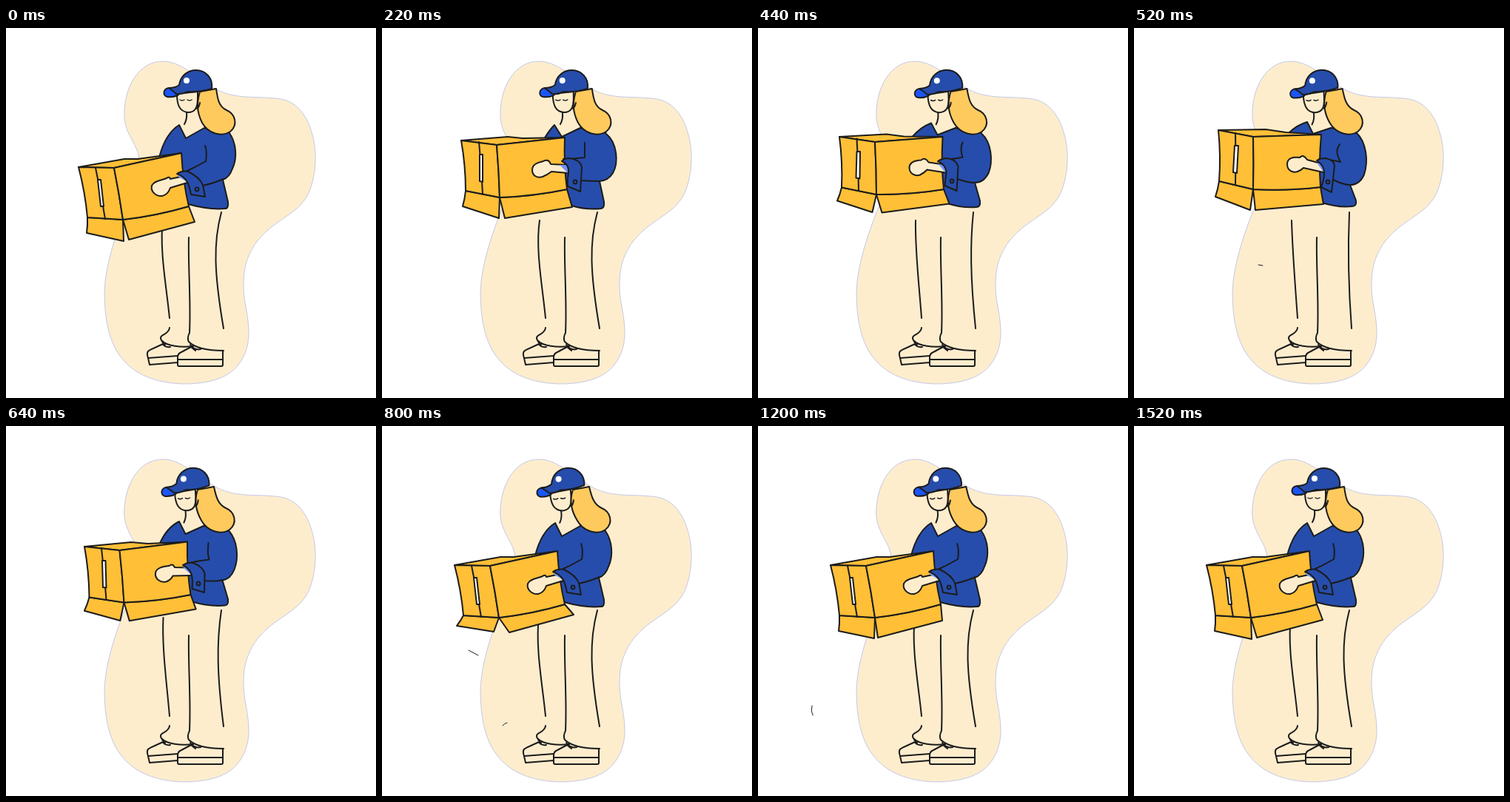
An HTML page that plays this animation: 500 px wide and 500 px high, repeating every 1.54 s.

```html
<!DOCTYPE html>
<html lang="en">
<head>
<meta charset="utf-8">
<title>Courier with a box</title>
<style>
  html, body { margin: 0; width: 100%; height: 100%; overflow: hidden; background: #fff; }
  svg { display: block; width: 100vw; height: 100vh; }
  .ink { stroke: #1c1c1c; stroke-width: 2; stroke-linecap: round; stroke-linejoin: round; fill: none; }
  .ink .skin, .skin { fill: #feedcd; }
  .blue { fill: #264dac; }
  .box { fill: #ffbf37; }
  .hair { fill: #ffca5d; }
  .bright { fill: #1b55f5; }
  .light { fill: #7096f8; stroke: none; }
  .white { fill: #fff; }
  .speck { stroke-width: 1; }
</style>
</head>
<body>
<svg viewBox="0 0 500 500">
  <path fill="#feedcd" stroke="#c3c9e8" stroke-width="1" d="M212 45 C176 45 158 86 160 122 C162 146 179 158 180 178 C181 210 164 237 156 260 C143 295 133 330 133 360 C134 407 143 442 176 464 C211 486 267 485 296 470 C320 457 329 432 328 408 C327 382 320 368 321 342 C322 312 334 288 360 268 C381 252 402 243 411 218 C421 190 421 154 407 125 C396 104 382 96 363 95 C337 92 308 97 281 81 C258 68 237 45 212 45 Z"/>
  <g class="ink">
    <path id="legs"/>
    <path d="M247 283 C246 325 250 368 248 412 C246 415 245 421 247 424 C257 434 275 436 294 436"/>
    <path d="M221 405 C220 416 205 413 210 422 C217 430 237 432 253 430"/>
    <path d="M232 452 L194 455 L192 446 C189 437 192 436 199 433 L212 427 M192 446 L232 443 M212 427 Q215 432 222 431 M211 424 L215 428"/>
    <path d="M293 436 V455 Q293 457 291 457 H234 Q232 457 232 455 V445 Q232 440 237 438 L250 431 M232 448 H293 M249 428 Q255 436 263 434 M250 431 L256 436"/>
    <path id="torso" class="blue"/>
    <g id="carton"></g>
    <path id="hand" class="skin"/>
    <path id="lining" class="light"/>
    <path id="arm" class="blue"/>
    <path id="cuff" class="blue"/>
    <circle id="button" r="2.4"/>
    <g class="head">
      <path d="M244 114 Q245 123 241 130"/>
      <path class="skin" d="M231 89 C231 103 234 113 246 114 C256 114 259 107 259 95 V86 Z"/>
      <path stroke-width="1.5" d="M235 97 Q238 99 241 97 M245 97 Q248 99 251 97"/>
    </g>
    <path id="hair" class="hair"/>
    <g class="head">
      <path d="M262 101 Q261 107 258 109"/>
      <path class="bright" d="M222 81 C212 80 211 92 218 93 Q226 94 232 91 L237 86 Z"/>
      <path class="blue" d="M220 81 Q229 81 234 77 C236 64 246 57 257 57 C270 57 280 68 278 82 Q262 87 246 86 Q238 90 230 89 Q226 85 220 81 Z"/>
      <circle class="white" cx="244" cy="71" r="4" stroke="none"/>
    </g>
    <g id="specks"></g>
  </g>
</svg>
<script>
const LOOP = 1540, STEP = 20;
const $ = id => document.getElementById(id);
const smooth = k => k * k * (3 - 2 * k);
const linear = k => k;
const numbers = /-?\d+(\.\d+)?/g;

// Blend two strings that differ only in their numbers.
function mix(a, b, k) {
  const ends = b.match(numbers);
  let i = 0;
  return a.replace(numbers, n => (+n + (ends[i++] - n) * k).toFixed(2));
}

function pick(times, poses, t, ease) {
  let i = 0;
  while (i < times.length - 2 && t >= times[i + 1]) i++;
  const k = Math.min(1, (t - times[i]) / (times[i + 1] - times[i]));
  return mix(poses[i], poses[i + 1], ease(k));
}

// Rest, first lift, dip, second lift, and back to rest.
const liftTimes = [0, 220, 360, 520, 760, LOOP];
const lift = (poses, t) => pick(liftTimes, [...poses, poses[0], poses[0]], t, smooth);

const shapes = {
  legs: [
    "M212 258 C207 300 217 350 221 392 M291 249 C280 290 281 330 294 406",
    "M213 260 C207 300 217 350 221 392 M291 249 C280 290 281 330 294 406",
    "M213 260 C210 300 218 350 221 392 M291 249 C284 290 285 335 294 406",
    "M213 260 C214 300 218 350 221 392 M291 249 C289 295 289 340 294 406"
  ],
  torso: [
    "M207 175 Q215 143 234 131 L243 149 L268 135 C285 140 300 137 302 142 C311 155 313 175 306 190 Q302 202 293 205 L300 235 Q301 244 296 244 Q275 246 246 238 L215 200 Z",
    "M219 150 Q226 138 233 131 L243 147 L268 135 C285 140 300 137 303 143 C318 155 320 182 312 196 Q306 206 294 207 L300 235 Q301 243 296 244 Q275 246 256 240 L215 200 Z",
    "M207 153 Q219 137 234 130 L243 146 L268 135 C285 140 300 137 303 143 C317 155 319 180 312 194 Q305 206 294 206 L300 234 Q301 243 295 243 Q275 244 258 238 L215 200 Z",
    "M209 142 Q220 131 234 127 L242 143 L266 135 C285 138 299 137 301 142 C314 154 317 180 311 198 Q305 212 292 212 L300 233 Q301 241 295 241 Q275 243 254 236 L225 200 Z"
  ],
  hand: [
    "M241 200 L222 204 Q221 200 217 203 C211 206 200 206 197 213 C195 221 203 228 211 227 Q219 225 222 216 L245 209",
    "M250 185 L228 184 Q225 176 218 180 C210 182 203 184 203 192 C203 200 210 203 217 201 Q224 198 229 194 L251 196",
    "M249 186 L227 185 Q223 178 217 182 C210 184 202 187 202 194 C203 202 210 205 217 203 Q224 199 228 194 L251 196",
    "M252 183 L234 178 Q229 170 224 175 C214 174 207 176 207 184 C207 193 215 196 221 194 Q226 192 229 189 L256 195"
  ],
  lining: [
    "M231 200 L239 197 L245 208 Z",
    "M240 185 L251 185 L251 196 Z",
    "M240 186 L250 186 L251 196 Z",
    "M247 182 L255 184 L256 195 Z"
  ],
  arm: [
    "M269 159 C272 167 271 174 270 180 Q258 187 243 194 L266 213 Q283 209 294 204",
    "M274 155 C274 162 274 168 274 175 Q260 177 245 177 L269 206 Q283 207 294 207",
    "M275 152 C274 157 275 164 274 168 Q272 177 246 179 L270 203 Q283 206 294 206",
    "M278 157 C274 163 272 168 279 181 Q262 177 250 177 L269 205 Q283 212 292 212"
  ],
  cuff: [
    "M231 197 Q238 192 246 194 Q262 202 266 212 L269 228 L250 225 Q248 214 245 208 Q240 200 231 197 Z",
    "M243 180 Q247 176 253 176 Q268 178 270 188 L268 221 L251 214 Q250 205 252 196 Q253 184 243 180 Z",
    "M239 181 Q246 176 253 176 Q266 178 270 188 L270 218 L252 211 Q250 203 252 193 Q250 184 239 181 Z",
    "M247 179 Q252 176 259 176 Q270 178 271 186 L267 222 L253 215 Q257 205 257 195 Q257 186 247 179 Z"
  ]
};
const buttonPoses = ["258 218", "261 208", "262 206", "262 208"];

// Left, tape, front and right top corners, two back corners,
// left, tape, front and right bottom corners, then the handle.
const cartonPoses = [
  "98 188 121 189 146 189 237 169 160 177 178 177 110 256 134 258 158 259 247 241 124 205 128 205 132 241 128 241",
  "107 152 131 154 155 158 247 148 170 147 190 149 113 220 136 224 159 229 250 218 132 171 136 171 136 208 132 207",
  "106 156 130 157 155 161 246 150 169 150 189 152 111 224 135 228 159 232 250 221 131 175 135 175 136 211 131 210",
  "114 138 137 142 161 147 253 144 178 137 205 141 115 207 137 212 161 218 252 215 136 159 141 159 139 196 134 195"
];

// Flap tips, measured from the corners they hang on.
const flapTimes = [0, 220, 360, 520, 800, 1200, 1500, LOOP];
const flapPoses = [
  "-1 21 1 29 8 27 8 21",
  "-4 21 -1 28 7 28 7 24",
  "-7 15 -7 20 12 21 11 16",
  "-5 21 -4 28 3 28 4 23",
  "-9 14 -7 19 14 20 12 14",
  "-1 21 -1 28 4 27 2 22",
  "-1 21 1 29 8 27 8 21",
  "-1 21 1 29 8 27 8 21"
];

const headTimes = [0, 220, 360, 520, 800, 900, 1200, 1500, LOOP];
const headPoses = ["0", "0.05", "0.25", "0.58", "1", "1", "0.68", "0", "0"];
const hairPoses = [
  "M262 86 C258 100 257 112 265 128 C273 142 290 148 303 140 C314 131 310 116 298 111 C287 106 286 95 284 82 Q274 84 262 86 Z",
  "M258 86 C254 98 254 112 264 128 C272 142 290 148 302 140 C313 131 309 116 297 111 C286 106 283 95 280 82 Q270 84 258 86 Z"
];

const points = text => {
  const n = text.split(" ").map(Number);
  return n.filter((_, i) => i % 2 === 0).map((x, i) => [x, n[2 * i + 1]]);
};
const poly = (...list) => "M" + list.join("L") + "Z";
const bow = (a, b, dx, dy) => `Q${(a[0] + b[0]) / 2 + dx} ${(a[1] + b[1]) / 2 + dy} ${b}`;
const part = (cls, d) => `<path class="${cls}" d="${d}"/>`;

function drawCarton(t) {
  const [tl, tape, tf, tr, backL, backR, bl, tapeB, bf, br, ...handle] = points(lift(cartonPoses, t));
  const tips = points(pick(flapTimes, flapPoses, t, smooth));
  const [l, lf, rf, r] = [bl, bf, bf, br].map((p, i) => [p[0] + tips[i][0], p[1] + tips[i][1]]);
  $("carton").innerHTML =
    part("box", `M${tl}L${backL}L${backR}L${tr}L${tf}Z`) +
    part("box", `M${bl}${bow(bl, l, 1, 0)}L${lf}L${bf}Z`) +
    part("box", `M${bf}L${rf}L${r}L${br}${bow(br, bf, 0, 4)}Z`) +
    part("box", `M${tl}L${tf}${bow(tf, bf, 1, 0)}L${bl}${bow(bl, tl, 3, 0)}Z`) +
    part("box", `M${tf}L${tr}${bow(tr, br, -3, 2)}${bow(br, bf, 0, 4)}${bow(bf, tf, 1, 0)}Z`) +
    part("", `M${tape}${bow(tape, tapeB, 1, 0)}`) +
    part("white", poly(...handle));
}

// Loose shreds flash by: time, path.
const specks = [
  [520, "M168 320 L174 321"],
  [800, "M117 303 L130 310"],
  [800, "M163 405 Q165 402 169 401"],
  [1200, "M73 378 Q71 385 74 391"]
];

function drawSpecks(t) {
  $("specks").innerHTML = specks.map(([when, d]) => {
    const dt = t - when;
    return Math.abs(dt) > 50 ? "" :
      `<g transform="translate(${-0.12 * dt} ${0.15 * dt})">${part("speck", d)}</g>`;
  }).join("");
}

const heads = document.querySelectorAll(".head");

function draw(t) {
  for (const id in shapes) $(id).setAttribute("d", lift(shapes[id], t));
  const [x, y] = lift(buttonPoses, t).split(" ");
  $("button").setAttribute("cx", x);
  $("button").setAttribute("cy", y);
  const tilt = +pick(headTimes, headPoses, t, linear);
  heads.forEach(g => g.setAttribute("transform", `rotate(${-4.5 * tilt} 250 140)`));
  $("hair").setAttribute("d", mix(hairPoses[0], hairPoses[1], tilt));
  drawCarton(t);
  drawSpecks(t);
}

const start = performance.now();
function tick() {
  const t = (performance.now() - start) % LOOP;
  draw(Math.floor(t / STEP) * STEP);
  requestAnimationFrame(tick);
}
tick();
</script>
</body>
</html>
```
